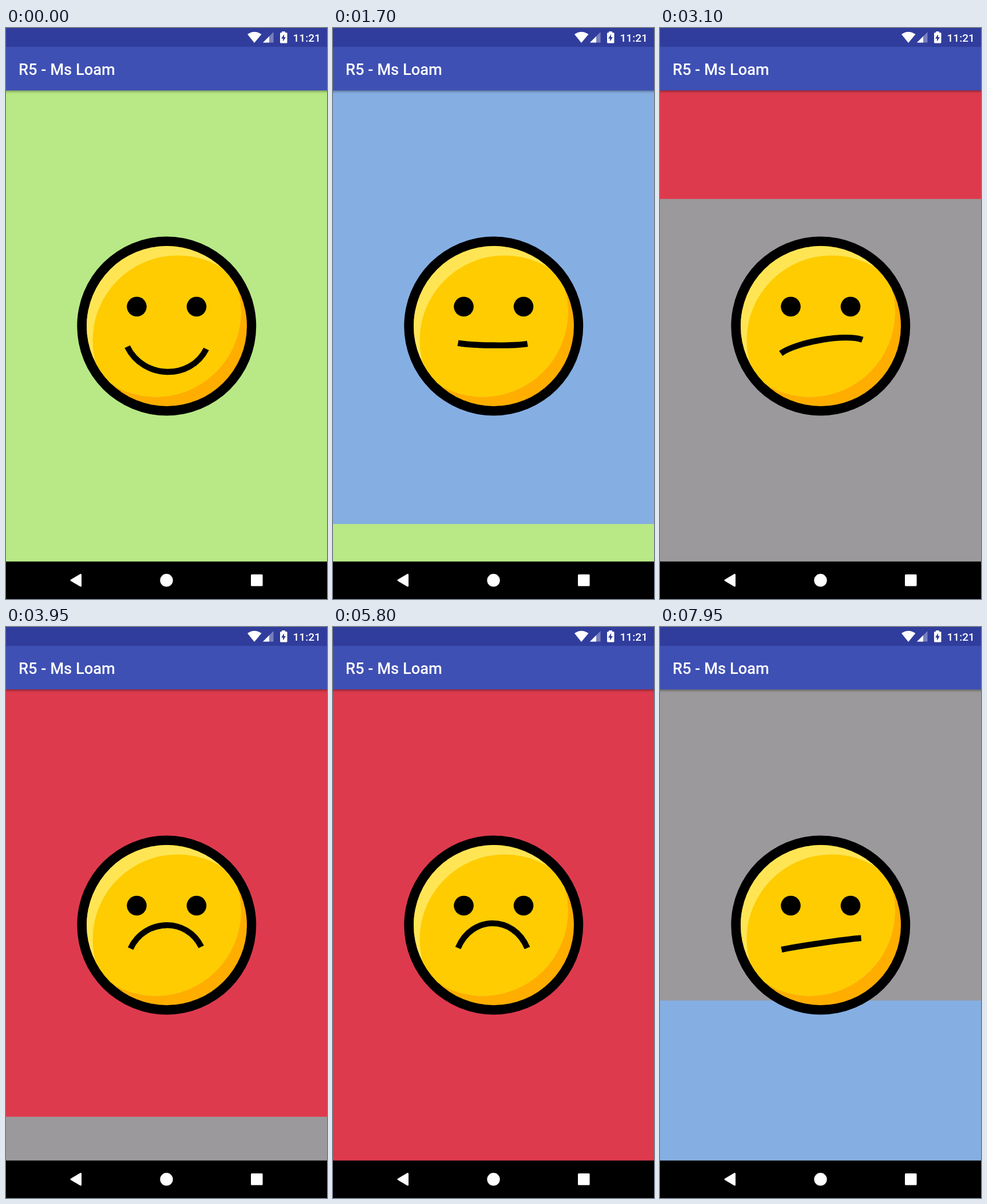
Animation of 561x998 px, one loop 8 s. Source, as an HTML page:

```html
<!DOCTYPE html>
<html lang="en">
<head>
<meta charset="utf-8">
<title>Mood pager</title>
<style>
  html, body { margin: 0; width: 100%; height: 100%; overflow: hidden; background: #000; }
  svg { display: block; width: 100%; height: 100%; }
  text { font-family: Roboto, sans-serif; font-weight: 500; fill: #fff; }
</style>
</head>
<body>
<svg viewBox="0 0 561 998">
  <defs>
    <linearGradient id="shade" x2="0" y2="1">
      <stop offset="0" stop-color="#000" stop-opacity=".36"/>
      <stop offset=".4" stop-color="#000" stop-opacity=".14"/>
      <stop offset="1" stop-color="#000" stop-opacity="0"/>
    </linearGradient>
    <clipPath id="disc"><circle cx="281" cy="521" r="140"/></clipPath>
    <clipPath id="lit"><circle cx="262" cy="496" r="148.500"/></clipPath>
  </defs>

  <rect id="below" y="109" width="561" height="824"/>
  <rect id="above" y="109" width="561"/>

  <!-- Face: two offset circles leave a highlight and a shadow crescent -->
  <circle cx="280.750" cy="521" r="156.500"/>
  <g clip-path="url(#disc)">
    <rect x="140" y="380" width="282" height="282" fill="#ffae00"/>
    <g clip-path="url(#lit)">
      <rect x="140" y="380" width="282" height="282" fill="#ffe554"/>
      <circle cx="300" cy="546" r="148.500" fill="#fecc00"/>
    </g>
  </g>
  <circle cx="228.500" cy="487" r="17.300"/>
  <circle cx="333" cy="487" r="17.300"/>
  <path id="mouth" fill="none" stroke="#000" stroke-width="10.400"/>

  <!-- App bar and status bar -->
  <rect y="109" width="561" height="6" fill="url(#shade)"/>
  <rect y="33" width="561" height="76" fill="#3f50b4"/>
  <rect width="561" height="33" fill="#303d9d"/>
  <text x="22" y="81.500" font-size="27.300">R5 - Ms Loam</text>
  <text x="501.500" y="24" font-size="19.100">11:21</text>
  <g fill="#fff">
    <path d="M434 26L422 11Q434 2.500 446.500 11Z"/>
    <path d="M449 25.500L467.500 7V25.500Z" opacity=".35"/>
    <path d="M449 25.500L460 14.500V25.500Z"/>
    <rect x="482" y="6" width="6" height="4"/>
    <rect x="479" y="8" width="12.500" height="18.500" rx="1.500"/>
    <path d="M486 11L481 18.500H484V23.500L489 16H486Z" fill="#303d9d"/>
  </g>

  <!-- Navigation bar -->
  <rect y="932.500" width="561" height="65.500"/>
  <g fill="#fff" stroke="#fff" stroke-width="3" stroke-linejoin="round">
    <path d="M114 965.200L130.500 955.500V975Z"/>
    <circle cx="280.500" cy="965.300" r="9.700"/>
    <rect x="429.500" y="956.500" width="17.600" height="17.600"/>
  </g>
</svg>
<script>
const LOOP = 8000, STEP = 50, PAGE = 824;
const DRAG = 1.5, SLOW_DRAG = 1.85, FLING = 5, STEADY = 1;

// Each mood: page colour, mouth corners, and how far the lip bends from the chord
const moods = [
  { color: '#b8e986', mouth: [212, 557, 350, 561, 56] },
  { color: '#85afe3', mouth: [219, 550, 339, 551, 0] },
  { color: '#9b999b', mouth: [209, 571, 358, 540, -3] },
  { color: '#de3a4e', mouth: [218.5, 561, 339.5, 561, -57.5] }
];

// Finger gestures: start, end, page reached, ease-out power
const gestures = [
  [450, 1400, 0.523, DRAG], [1520, 2120, 1, FLING],
  [2400, 2500, 1.152, DRAG], [2500, 2910, 2, FLING],
  [2910, 4350, 3, SLOW_DRAG],
  [4750, 5320, 2.664, DRAG], [5320, 5900, 3, FLING],
  [6100, 6850, 2.299, DRAG], [7050, 7500, 2, FLING],
  [7750, LOOP, 1.575, STEADY]
];

const [below, above, mouth] = ['below', 'above', 'mouth'].map(id => document.getElementById(id));
const mix = (a, b, k) => a + (b - a) * k;

function positionAt(time) {
  let position = 0;
  for (const [start, end, page, power] of gestures) {
    if (time <= start) break;
    const k = Math.min((time - start) / (end - start), 1);
    position = mix(position, page, 1 - (1 - k) ** power);
  }
  return position;
}

function mouthPath([x1, y1, x2, y2, bend]) {
  const control = k => [mix(x1, x2, k), mix(y1, y2, k) + bend];
  return `M${x1},${y1}C${control(0.2)},${control(0.8)},${x2},${y2}`;
}

function draw(time) {
  const position = positionAt(time);
  const page = Math.min(Math.floor(position), moods.length - 2);
  const part = position - page;
  const [from, to] = [moods[page], moods[page + 1]];
  below.setAttribute('fill', from.color);
  above.setAttribute('fill', to.color);
  above.setAttribute('height', part * PAGE);
  mouth.setAttribute('d', mouthPath(from.mouth.map((v, i) => mix(v, to.mouth[i], part))));
}

const start = performance.now();
function tick() {
  const time = (performance.now() - start) % LOOP;
  draw(Math.floor(time / STEP) * STEP);
  requestAnimationFrame(tick);
}
tick();
</script>
</body>
</html>
```
